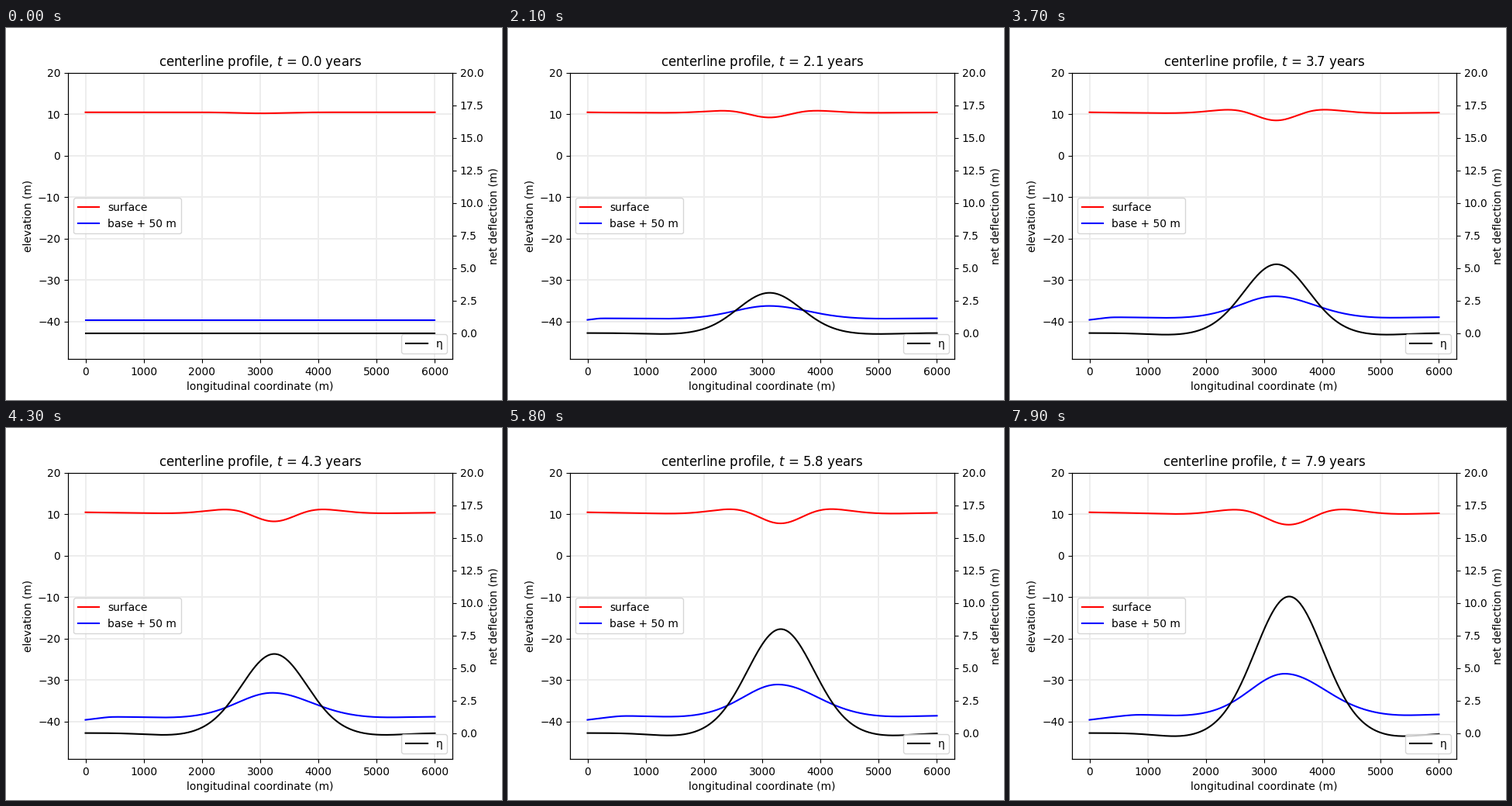
These frames come from a looping animation (640 px wide and 480 px high, 8000 ms). A matplotlib script:

```python
import numpy as np
import matplotlib.pyplot as plt
from matplotlib.animation import FuncAnimation

FRAMES, INTERVAL = 80, 100
SURFACE, BASE = 10.45, -39.55   # flotation levels of 100 m ice, base shifted by 50 m
FLOW, MELT = 100.0, 0.2         # m/yr
BUOYANCY = 917 / 1024

x = np.linspace(0, 6000, 301)


def bell(center, width):
    return np.exp(-0.5 * ((x - center) / width) ** 2)


def warm_up(t):
    return 1 - np.exp(-3 * t)


def background_melt(t):
    """Uniform thinning, limited by the time since ice entered at x = 0."""
    age = x / FLOW
    return MELT * 0.5 * (age + t - np.sqrt((age - t) ** 2 + 0.04 * age * t))


def troughs(t):
    """Flexural lows on both sides of the uplift."""
    center, reach = 3018 + 52 * t, 1710 + 16 * t
    amp = 0.027 * uplift(t)
    return amp * (bell(center - reach, 450) + bell(center + reach, 450))


def uplift(t):
    return 1.5 * t - 0.0225 * t ** 2 + 0.04 * warm_up(t)


def deflection(t):
    return uplift(t) * bell(3018 + 52 * t, 530 + 6.3 * t) - troughs(t)


def surface(t):
    loss = 0.25 + t * (1.98 - 0.02 * t - 0.0027 * t ** 2)
    notch = loss * bell(3018 + 51.5 * t, np.hypot(400, 33.6 * t))
    return SURFACE - (1 - BUOYANCY) * background_melt(t) + deflection(t) - notch


def base(t):
    center = 3035 + 40 * t
    width = np.where(x < center, 580, 620 + 8 * t)
    rise = t * (1.43 - 0.027 * t) + 0.1 * warm_up(t)
    return (BASE + BUOYANCY * background_melt(t)
            + rise * bell(center, width) - 1.4 * troughs(t))


fig, ax = plt.subplots(figsize=(6.4, 4.8), dpi=100)
right = ax.twinx()

ax.grid(color="0.93", lw=1.4)
ax.set_axisbelow(True)
top_line, = ax.plot(x, surface(0), "r", label="surface")
base_line, = ax.plot(x, base(0), "b", label="base + 50 m")
eta_line, = right.plot(x, deflection(0), "k", label="η")

ax.set_xlim(-300, 6300)
ax.set_ylim(-49, 20)
right.set_ylim(-2, 20)
ax.set_xlabel("longitudinal coordinate (m)")
ax.set_ylabel("elevation (m)")
right.set_ylabel("net deflection (m)")
ax.legend(loc="center left")
right.legend(loc="lower right")
title = ax.set_title("")


def update(i):
    t = i * INTERVAL / 1000
    top_line.set_ydata(surface(t))
    base_line.set_ydata(base(t))
    eta_line.set_ydata(deflection(t))
    title.set_text(f"centerline profile, $t$ = {t:.1f} years")
    return top_line, base_line, eta_line, title


anim = FuncAnimation(fig, update, frames=FRAMES, interval=INTERVAL,
                     repeat=True, repeat_delay=0, blit=False)
plt.show()
```
